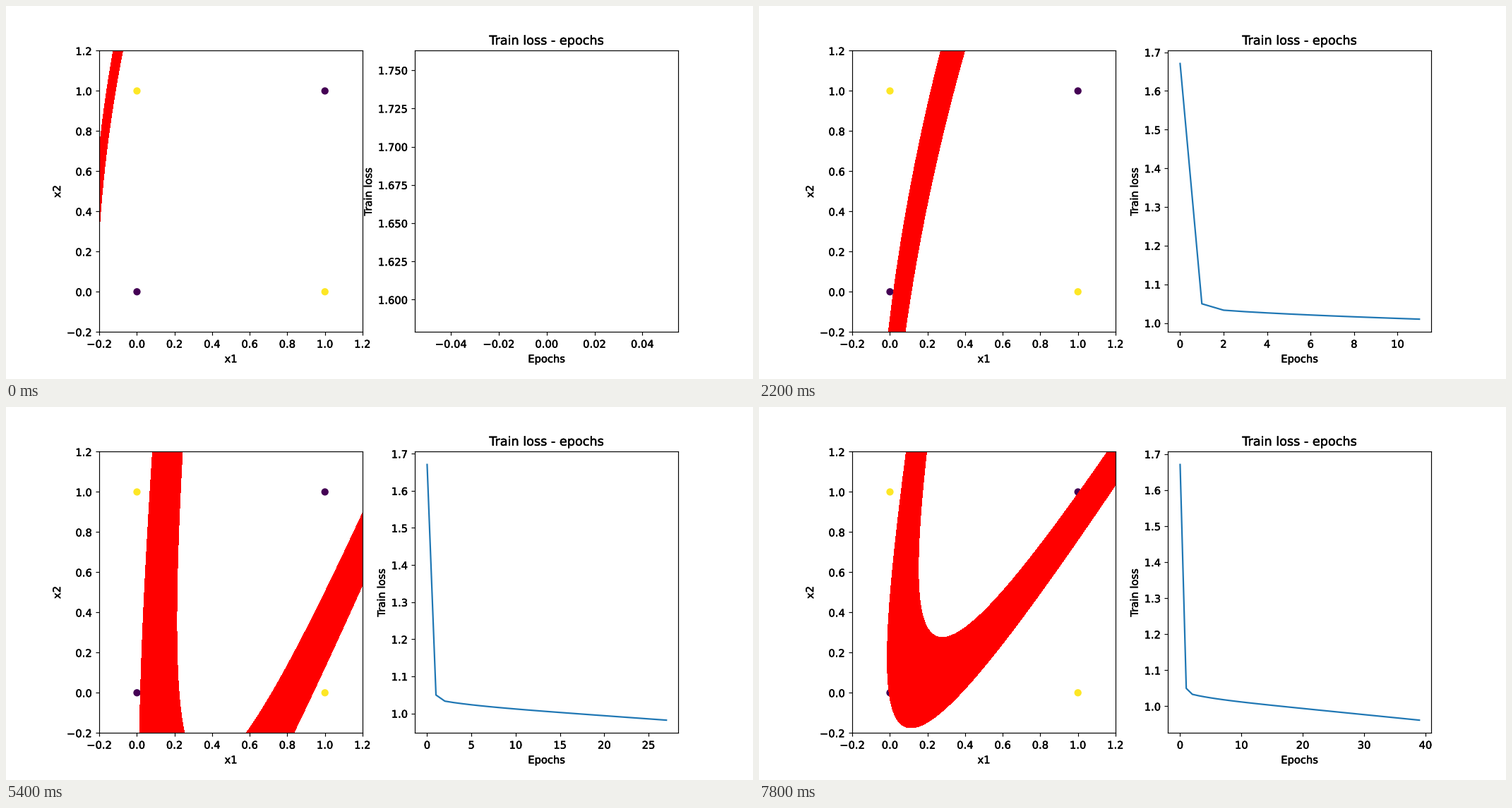
A matplotlib script that plays this animation: 1058x529 px, repeating every 8 s.

```python
import numpy as np
import matplotlib.pyplot as plt
from matplotlib.animation import FuncAnimation
from matplotlib.patheffects import withStroke

W = 1058
EPOCHS = 40

epochs = np.arange(EPOCHS)
x, y = np.meshgrid(np.linspace(-0.2, 1.2, 281), np.linspace(-0.2, 1.2, 281))


def first_step(t):
    """Share of the untrained state that is left; gone after one epoch."""
    return np.exp(-3.9 * t)


def train_loss(t):
    return 1.0278 - 0.0017 * t + 0.014 * np.exp(-t / 4) + 0.629 * first_step(t)


def band_field(t):
    """Positive inside the decision band.

    Two saturating units, one per arm of the V, decay exponentially away from
    their lines; each edge of the band is where their sum equals one.
    """
    start = first_step(t)
    late = max(0, t - 25) ** 2
    to_go = EPOCHS - 1 - t

    # Left arm: a slightly bent line, its softness and its width.
    bend = 0.08 / (1 + (t / 13) ** 4)
    offset = 0.1 + 0.0018 * (t - 6) - 0.0009 * late - 0.303 * start
    lean = 0.205 - 0.0066 * (t - 6) + 0.00086 * late - 0.2256 * start
    left = offset + lean * y + bend * y ** 2
    left_soft = 0.7 - 0.007 * t
    left_width = 0.068 + 0.0038 * (t - 6) - 0.0005 * late + bend / 2 * (y + 0.2)
    left_width *= 1 - start / 2

    # Right arm: slides in from the lower right.
    right = 0.365 + 0.032 * to_go + 0.0007 * to_go ** 2 + (0.69 - 0.02 * to_go) * y
    right_soft, right_width = 0.343, 0.145

    def edge(grow):
        return (np.exp((left - grow * left_width - x) / left_soft)
                + np.exp((x - right - grow * right_width) / right_soft) - 1)

    return np.minimum(edge(0), -edge(1))


def thicken_text(ax):
    labels = [ax.title, ax.xaxis.label, ax.yaxis.label]
    labels += ax.get_xticklabels() + ax.get_yticklabels()
    for label in labels:
        label.set_path_effects([withStroke(linewidth=0.3, foreground="black")])


plt.rcParams["font.family"] = "DejaVu Sans"
fig, (plane, chart) = plt.subplots(1, 2, figsize=(10, 5), dpi=W / 10)
fig.subplots_adjust(left=0.125, right=0.9, bottom=0.1262, top=0.88, wspace=0.2)

plane.scatter([0, 0, 1, 1], [0, 1, 0, 1], c=[0, 1, 1, 0], cmap="viridis")
plane.set(xlim=(-0.2, 1.2), ylim=(-0.2, 1.2), xlabel="x1", ylabel="x2")

line, = chart.plot([], [], color="tab:blue", lw=1.5)
chart.set(title="Train loss - epochs", xlabel="Epochs", ylabel="Train loss")

bands = []


def update(t):
    while bands:
        bands.pop().remove()
    bands.append(plane.contourf(x, y, band_field(t), levels=[0, 1e9],
                                colors=["red"], zorder=1.5))
    line.set_data(epochs[:t + 1], train_loss(epochs[:t + 1]))
    chart.relim()
    chart.autoscale_view()
    for ax in (plane, chart):
        thicken_text(ax)
    return bands[0], line


anim = FuncAnimation(fig, update, frames=EPOCHS, interval=200,
                     init_func=lambda: update(0), repeat=True, repeat_delay=0)
plt.show()
```
